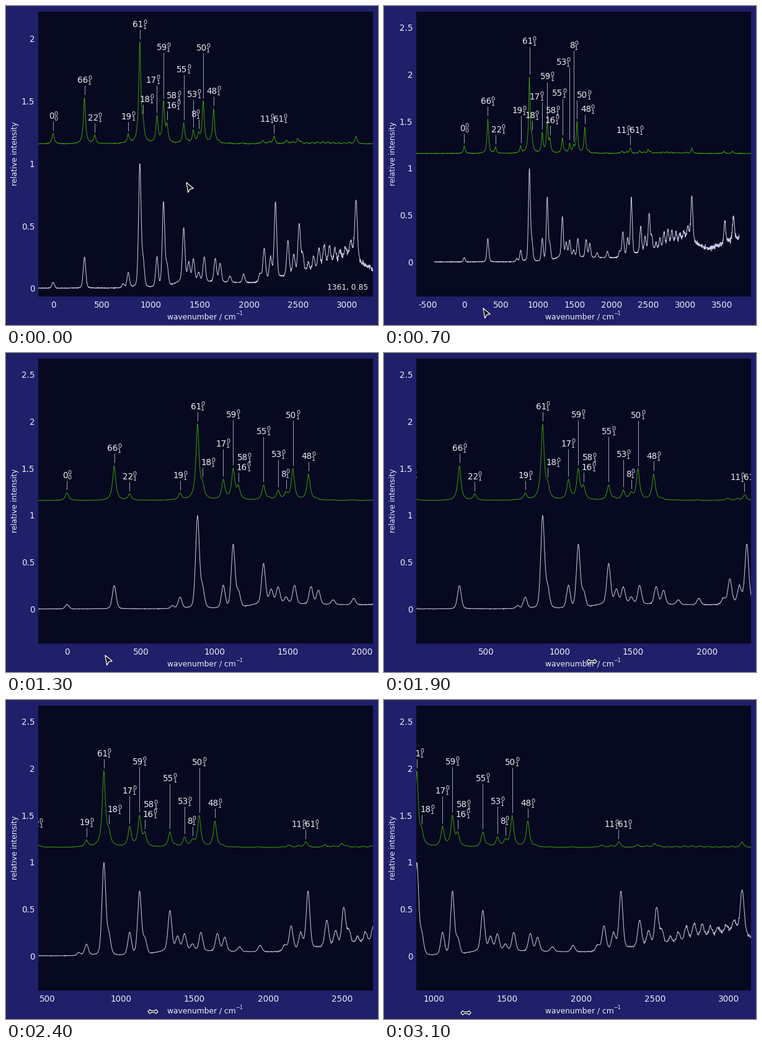
Animation of 600 by 515 pixels, one loop 3200 ms. Source, as a matplotlib script:

```python
import numpy as np
import matplotlib.pyplot as plt
from matplotlib.animation import FuncAnimation
from matplotlib.patches import Polygon, Rectangle
from matplotlib.transforms import Bbox, TransformedBbox

W, H, DPI = 600, 515, 100
LEFT, RIGHT, TOP, BOTTOM = 52, 592, 9, 469
NAVY, DARK, INK = "#1f1f6a", "#070920", "#ececf4"
GREEN, PALE, STEM = "#3f950c", "#c9c9ec", "#9c9cb8"
PX = 72 / DPI

# label, position, height in the green and in the pale curve
BANDS = [
    ("0", 0, .083, .045), ("66", 320, .37, .25), ("22", 425, .065, 0),
    ("19", 767, .07, .12), ("61", 885, .8, .985), ("18", 919, .12, .2),
    ("17", 1060, .21, .24), ("59", 1127, .32, .68), ("58/16", 1163, .13, .16),
    ("55", 1333, .16, .43), ("53", 1432, .1, .18), ("8", 1486, .065, .07),
    ("50", 1532, .31, 0), ("48", 1638, .26, 0), ("11 61", 2254, 0, 0),
    ("", 3092, .06, .47)]
# unlabelled bands of the pale curve, faint in the green one
EXTRAS = [
    (715, .03), (1385, .15), (1543, .2), (1655, .19), (1705, .15), (1805, .05),
    (1945, .07), (2112, .06), (2155, .26), (2220, .17), (2270, .61),
    (2397, .28), (2457, .16), (2512, .41), (2547, .15), (3540, .22),
    (3658, .24)]
EXTRAS += [(2605 + 54 * i, .12 + .05 * np.sin(.9 * i - 1)) for i in range(9)]
BASE = [(1150, .005), (1300, .055), (2060, .045), (2350, .09), (2600, .12),
        (3060, .27), (3150, .2), (3320, .14), (3735, .27)]

# stem length steps, one digit per label
ROOMY, CROWDED = "000000240420400", "000220230379100"

CURSOR = [(4, 291, 285), (5, 280, 303), (7, 160, 488), (14, 160, 488),
          (17, 388, 497), (19, 335, 498), (24, 237, 503), (28, 161, 504),
          (31, 132, 505)]
DRAG_START = 17
ARROW = np.array([(0, 0), (2.8, 16), (5.6, 10.6), (11.2, 9.4)])
HALF = [(-8, 0), (-5, -3.2), (-3, -1.3), (3, -1.3), (5, -3.2)]
GRIP = np.array(HALF + [(-x, -y) for x, y in HALF])


def lorentz(u):
    return 1 / (1 + u * u)


def green_y(x):
    bands = [(c, h) for _, c, h, _ in BANDS]
    bands += [(c - 14, .1 * h) for c, h in EXTRAS]
    return 1.16 + sum(h * lorentz((x - c) / 12.5) for c, h in bands)


def pale_y(x):
    y = np.interp(x, *zip(*BASE))
    for c, h in [(c, h) for _, c, _, h in BANDS] + EXTRAS:
        u = (x - c) / 15
        y = y + h * (.75 * np.exp(-.693 * u * u) + .25 * lorentz(u))
    return y


rng = np.random.default_rng(4)
gx = np.arange(-1000, 4600, 3)
gy = green_y(gx) + rng.normal(0, .0016, gx.size)
px = np.arange(-405, 3736, 2.5)
rough = np.interp(px, [1900, 3735], [.0018, .016])
py = pale_y(px) + rng.normal(0, 1, px.size) * rough

fig = plt.figure(figsize=(W / DPI, H / DPI), dpi=DPI, facecolor=NAVY)
ax = fig.add_axes([0, 0, 1, 1])


def cursor(k):
    t, x, y = zip(*CURSOR)
    return np.interp(k, t, x), np.interp(k, t, y)


def view(k):
    """Pixel origin and scale: zoom out, stretch x, then drag."""
    z = 1.1 ** (-.75 * min(k, 4))
    x0, sx = 291 + (76 - 291) * z, .158 * z
    y0, sy = 285 + 171.5 * z, 201.6 * z
    q = 2.003 ** (np.clip(k - 8, 0, 5) / 5)
    x0, sx = 160.4 + (x0 - 160.4) * q, sx * q
    if k > DRAG_START:
        x0 += cursor(k)[0] - cursor(DRAG_START)[0]
    return x0, sx, y0, sy


def write(x, y, s, size=13.5, ha="center", **kw):
    return ax.text(x, y + size * .365, s, size=size * PX, color=INK, ha=ha,
                   va="baseline", family="DejaVu Sans", **kw)


def name_width(s):
    return 8.6 * len(s) + 5.5


def band_name(x, y, s, clip):
    left = x - name_width(s) / 2
    right = left + 8.6 * len(s) + 2.5
    low = "0" if s == "0" else "1"
    write(left, y, s, ha="left", clip_on=True).set_clip_box(clip)
    for dy, digit in ((-4, "0"), (4, low)):
        write(right, y + dy, digit, 9.5, clip_on=True).set_clip_box(clip)


def draw_labels(to_x, to_y, steps, clip):
    spots = []
    for (name, v, *_), step in zip(BANDS, steps):
        peak = to_y(green_y(v))
        spots.append((name, to_x(v), peak, peak - 19.5 - 14.6 * int(step)))
    for i, (name, x, peak, top) in enumerate(spots):
        ax.plot([x, x], [top, peak - 4.5], color=STEM, lw=PX,
                solid_capstyle="butt")[0].set_clip_box(clip)
        # keep the text clear of taller stems next to it
        gap = name_width(name[:2]) / 2 + 5.5
        for _, near, _, height in spots[max(i - 1, 0):i + 2]:
            if height < top:
                x = max(x, near + gap) if near < x else min(x, near - gap)
        y = top - 9
        if " " in name:
            for s, dx in zip(name.split(), (-11.5, 10)):
                band_name(x + dx, y, s, clip)
        else:
            for row, s in enumerate(reversed(name.split("/"))):
                band_name(x + row, y - 15.5 * row, s, clip)


def draw(k):
    ax.cla()
    ax.set(xlim=(0, W), ylim=(H, 0))
    ax.axis("off")
    plot = ax.add_patch(Rectangle((LEFT, TOP), RIGHT - LEFT, BOTTOM - TOP,
                                  color=DARK, lw=0))
    clip = TransformedBbox(Bbox([[LEFT, 0], [RIGHT, H]]), ax.transData)
    x0, sx, y0, sy = view(k)

    def to_x(v):
        return x0 + sx * v

    def to_y(v):
        return y0 - sy * v

    for x, y, color in ((gx, gy, GREEN), (px, py, PALE)):
        line, = ax.plot(to_x(x), to_y(y), color=color, lw=PX)
        line.set_clip_path(plot)

    for v in range(-1000, 4500, 500):
        if LEFT <= to_x(v) <= RIGHT:
            write(to_x(v), 482, str(v))
    for v in np.arange(0, 3.5, .5):
        if TOP <= to_y(v) <= BOTTOM:
            write(46.5, to_y(v), f"{v:g}", ha="right")

    draw_labels(to_x, to_y, CROWDED if 0 < k < 11 else ROOMY, clip)

    write(260, 501, "wavenumber / cm", 12.2, "left")
    write(370, 496.5, "\u22121", 8, "left")
    ax.text(15, 238, "relative intensity", size=12.2 * PX, color=INK,
            rotation=90, ha="center", va="center", family="DejaVu Sans")

    cx, cy = cursor(k)
    if cy < BOTTOM:
        write(584, 454, f"{(cx - x0) / sx:.0f}, {(y0 - cy) / sy:.2f}", 12.2,
              "right")
    shape = GRIP if k >= DRAG_START else ARROW
    ax.add_patch(Polygon(shape + (cx, cy), fc="black", ec="white",
                         lw=1.3 * PX, joinstyle="round", zorder=9))


anim = FuncAnimation(fig, draw, frames=32, interval=100, repeat=True,
                     repeat_delay=0, init_func=lambda: draw(0))
plt.show()
```
